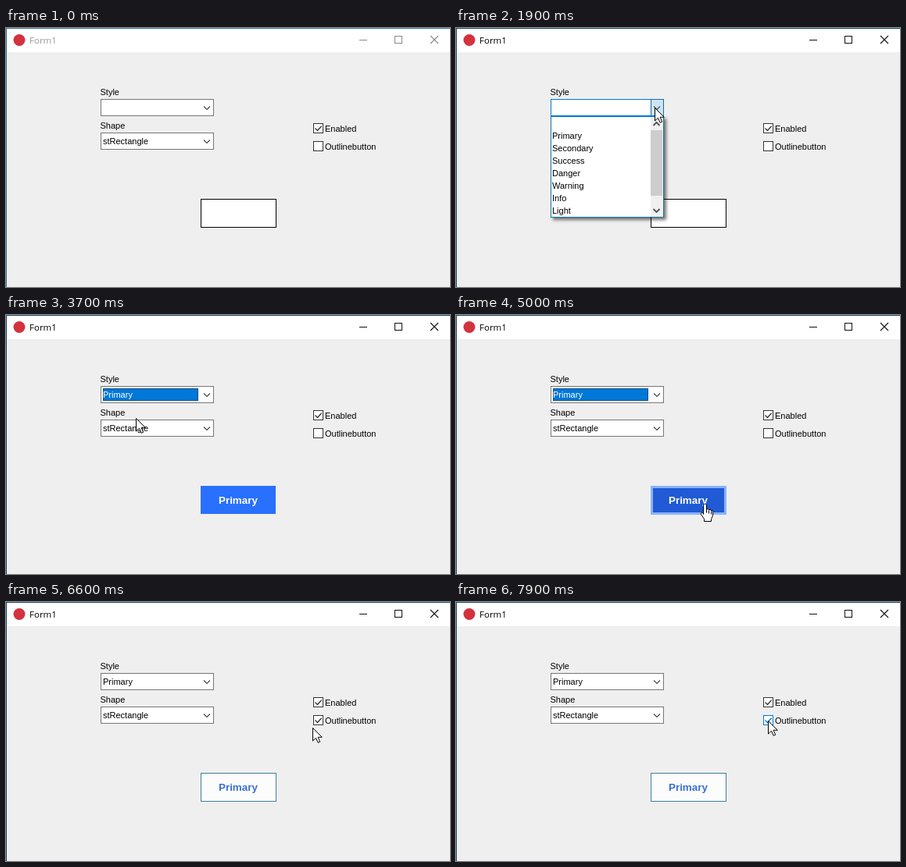
An HTML page with a canvas that plays this animation: 568 by 332 pixels, repeating every 8 s.

```html
<!DOCTYPE html>
<html lang="en">
<head>
<meta charset="utf-8">
<title>Form1</title>
<style>
html, body { margin: 0; width: 100%; height: 100%; overflow: hidden; background: #efefef; }
canvas { display: block; width: 568px; height: 332px; }
</style>
</head>
<body>
<canvas id="stage" width="568" height="332"></canvas>
<script>
const ctx = document.getElementById('stage').getContext('2d');
const LOOP = 8000, TICK = 100;
const UI = '11px "Liberation Sans", Arial, sans-serif';
const TITLE = '11.5px "Open Sans", sans-serif';
const BOLD = 'bold 13.4px "Liberation Sans", Arial, sans-serif';
const BLUE = '#0078d7';

// Moments of the three clicks, in ms
const OPEN = 1700, PICK = 2800, CHECK = 6200;

// Pointer stops: time, x, y
const STOPS = [
  [700, 228, 259], [1300, 218, 108], [1600, 254, 102], [1900, 254, 102],
  [2500, 167, 132], [2700, 167, 132], [3300, 166, 132], [4500, 166, 132],
  [5000, 318, 242], [5400, 326, 241], [6000, 400, 152], [6500, 400, 152],
  [7000, 322, 238], [7200, 324, 237], [7300, 324, 237], [7800, 399, 152], [8000, 399, 152]
];

const ARROW = [[0, 0], [0, 16.5], [4, 12.8], [6.7, 18.8], [9.2, 17.7], [6.6, 11.8], [11.8, 11.8]];

function pointer(t) {
  if (t < STOPS[0][0]) return null;
  const i = STOPS.findIndex((s, n) => n && t <= s[0]);
  const [t0, x0, y0] = STOPS[i - 1], [t1, x1, y1] = STOPS[i];
  const p = (t - t0) / (t1 - t0), k = p * p * (3 - 2 * p);
  return { x: Math.round(x0 + (x1 - x0) * k), y: Math.round(y0 + (y1 - y0) * k) };
}

function over(p, x, y, w, h) {
  return !!p && p.x >= x && p.x < x + w && p.y >= y && p.y < y + h;
}

function fill(x, y, w, h, color) {
  ctx.fillStyle = color;
  ctx.fillRect(x, y, w, h);
}

function frame(x, y, w, h, color) {
  ctx.strokeStyle = color;
  ctx.lineWidth = 1;
  ctx.strokeRect(x + 0.5, y + 0.5, w - 1, h - 1);
}

function box(x, y, w, h, back, border) {
  fill(x, y, w, h, back);
  frame(x, y, w, h, border);
}

function line(points, color, width) {
  ctx.strokeStyle = color;
  ctx.lineWidth = width;
  ctx.beginPath();
  points.forEach(([x, y]) => ctx.lineTo(x, y));
  ctx.stroke();
}

function text(str, x, y, color = '#000', font = UI) {
  ctx.font = font;
  ctx.fillStyle = color;
  ctx.fillText(str, x, y);
}

function dotted(x, y, w, h, color) {
  ctx.setLineDash([1, 1]);
  frame(x, y, w, h, color);
  ctx.setLineDash([]);
}

function chevron(x, y, dir, color, width) {
  line([[x - 4, y - 2 * dir], [x, y + 2 * dir], [x + 4, y - 2 * dir]], color, width);
}

function drawWindow(active) {
  fill(0, 0, 568, 332, '#efefef');
  fill(0, 0, 568, 31, '#fff');
  const edge = active ? '#164a68' : '#31759c';
  fill(0, 0, 568, 1, edge);
  fill(0, 0, 1, 332, edge);
  ctx.fillStyle = '#d3323f';
  ctx.beginPath();
  ctx.arc(17, 15.5, 7.5, 0, Math.PI * 2);
  ctx.fill();
  const ink = active ? '#000' : '#999';
  text('Form1', 30, 20, ink, TITLE);
  const sign = active ? '#111' : '#8a8a8a';
  fill(452, 15, 10, 1, sign);
  frame(497, 10, 10, 10, sign);
  line([[543, 10], [553, 20]], sign, 1.1);
  line([[553, 10], [543, 20]], sign, 1.1);
}

function drawCombo(y, value, hot, focused, opened) {
  box(121, y, 145, 22, '#fff', opened ? BLUE : hot ? '#333' : '#777');
  if (opened) box(249, y, 17, 22, '#cce4f7', '#1b6a9c');
  if (focused) {
    fill(124, y + 3, 122, 16, BLUE);
    dotted(124, y + 3, 122, 16, '#10202c');
  }
  text(value, 124, y + 15, focused ? '#fff' : '#000');
  chevron(257, y + 11.5, 1, '#444', 1.1);
}

function drawCheck(y, label, checked, hot) {
  const ink = hot ? BLUE : '#333';
  box(393, y, 13, 13, '#fff', ink);
  if (checked) line([[395.5, y + 6.5], [398.5, y + 9.5], [403.7, y + 3.8]], ink, 1.3);
  text(label, 408, y + 11);
}

function drawButton(picked, outlined, hot) {
  let ink = '#fff';
  if (!picked) {
    box(249, 219, 97, 37, '#fff', '#000');
    return;
  }
  if (hot) {
    fill(249, 219, 97, 37, '#8ab2fa');
    fill(252, 222, 91, 31, '#205ad5');
  } else if (outlined) {
    box(249, 219, 97, 37, '#fcfcfc', '#3d8199');
    ink = '#3a70d0';
  } else {
    fill(249, 219, 96, 36, '#2970ff');
  }
  text('Primary', 272, 242, ink, BOLD);
}

function drawList(p) {
  ctx.save();
  ctx.shadowColor = 'rgba(0,0,0,.55)';
  ctx.shadowBlur = 4;
  ctx.shadowOffsetX = ctx.shadowOffsetY = 3;
  fill(121, 113, 145, 130, '#fff');
  ctx.restore();
  const row = over(p, 122, 114, 127, 128) ? Math.floor((p.y - 114) / 16) : -1;
  ['', 'Primary', 'Secondary', 'Success', 'Danger', 'Warning', 'Info', 'Light'].forEach((name, i) => {
    const y = 114 + i * 16;
    if (i === row) {
      fill(122, y, 126, 16, BLUE);
      dotted(122, y, 126, 16, '#10202c');
    }
    text(name, 123, y + 12, i === row ? '#fff' : '#000');
  });
  fill(249, 114, 16, 128, '#f0f0f0');
  fill(249, 131, 15, 84, '#cdcdcd');
  chevron(256.5, 123, -1, '#505050', 1.8);
  chevron(256.5, 234, 1, '#505050', 1.8);
  frame(121, 113, 145, 130, '#15799f');
  fill(121, 112, 145, 2, BLUE);
}

function outline(path) {
  ctx.fillStyle = '#fff';
  ctx.strokeStyle = '#000';
  ctx.lineWidth = 1;
  ctx.lineJoin = 'round';
  ctx.fill(path);
  ctx.stroke(path);
  ctx.lineJoin = 'miter';
}

function drawPointer(p, hand) {
  ctx.save();
  ctx.translate(p.x + 0.5, p.y + 0.5);
  const path = new Path2D();
  if (hand) {
    path.moveTo(-2, 13);
    path.lineTo(-2, 1);
    path.quadraticCurveTo(0, -2, 2, 1);
    path.lineTo(2, 7);
    path.quadraticCurveTo(4, 4.5, 5, 7.5);
    path.quadraticCurveTo(7, 5.5, 8, 8.5);
    path.quadraticCurveTo(10, 7, 10, 10);
    path.lineTo(10, 15);
    path.lineTo(8, 19);
    path.lineTo(8, 22);
    path.lineTo(-1, 22);
    path.lineTo(-1, 19);
    path.lineTo(-5, 13);
    path.quadraticCurveTo(-5, 9, -2, 12);
    path.closePath();
  } else {
    ARROW.forEach(([x, y]) => path.lineTo(x, y));
    path.closePath();
  }
  outline(path);
  if (hand) [[2, 7], [5, 8], [8, 9]].forEach(([x, y]) => line([[x, y], [x, y + 4]], '#000', 1));
  ctx.restore();
}

function draw(t) {
  const p = pointer(t);
  const opened = t >= OPEN && t < PICK;
  const picked = t >= PICK, checked = t >= CHECK;
  const value = picked ? 'Primary' : '';
  // Combo borders keep their highlight briefly after the pointer leaves
  const warm = y => [0, 1, 2, 3].some(n => over(pointer(t - n * TICK), 121, y, 145, 22));
  const onButton = over(p, 249, 219, 97, 37);

  drawWindow(t >= OPEN);
  text('Style', 120.5, 86);
  text('Shape', 120.5, 129);
  drawCombo(91, value, !opened && warm(91), picked && !checked, opened);
  drawCombo(134, 'stRectangle', !opened && warm(134), false, false);
  drawCheck(122, 'Enabled', true, over(p, 393, 122, 54, 13));
  drawCheck(145, 'Outlinebutton', checked, over(p, 393, 145, 82, 13));
  drawButton(picked, checked, onButton);
  if (opened) drawList(p);
  if (p) drawPointer(p, onButton);
}

const start = performance.now();
function tick() {
  const t = (performance.now() - start) % LOOP;
  draw(Math.floor(t / TICK) * TICK);
  requestAnimationFrame(tick);
}
tick();
</script>
</body>
</html>
```
